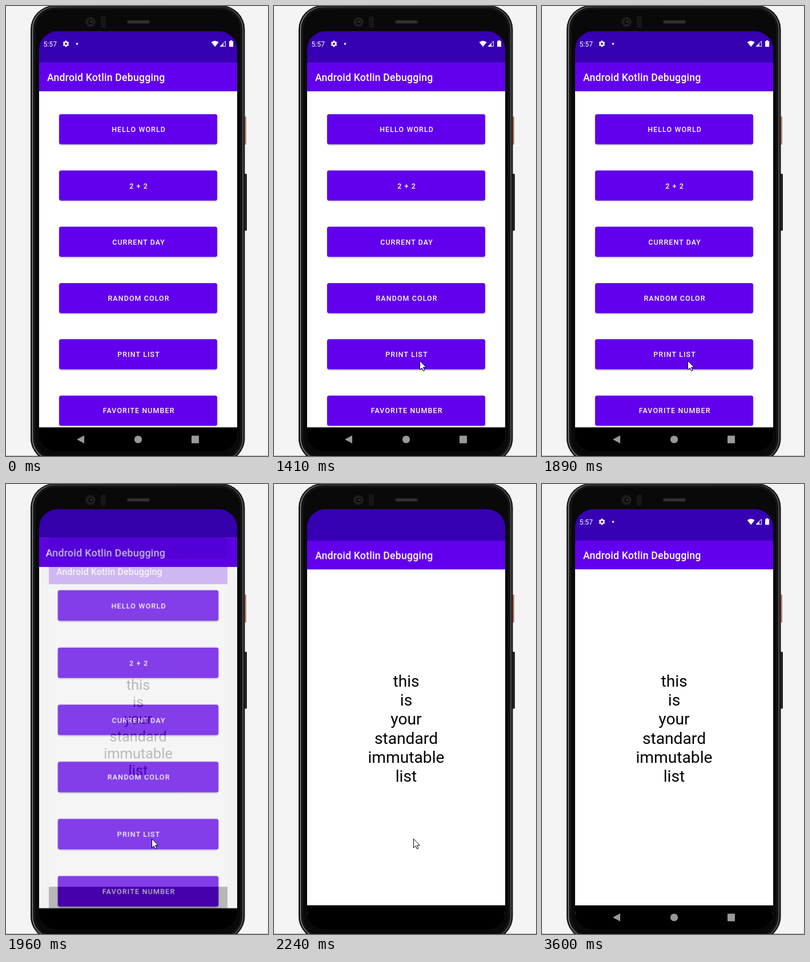
Recreate the animation shown at these times as an HTML page. Size 459 by 786 pixels, loop 4.2 s.

```html
<!DOCTYPE html>
<html lang="en">
<head>
<meta charset="utf-8">
<title>Android Kotlin Debugging</title>
<style>
  html, body { margin: 0; width: 100%; height: 100%; overflow: hidden; background: #f4f4f4; }
  svg { display: block; width: 459px; height: 786px; font-family: Roboto, sans-serif; }
  .title { font: 500 17.67px Roboto, sans-serif; letter-spacing: .22px; fill: #fff; }
  .label { font: 500 12.4px Roboto, sans-serif; letter-spacing: 1.13px; fill: #fff; text-anchor: middle; }
  .list { font-size: 28.2px; fill: #000; text-anchor: middle; }
  .clock { font-size: 12.2px; fill: #fff; }

  .anim { animation: 4.2s step-end infinite; }
  #home, #detail { transform-origin: 231.5px 410px; }
  #home { animation-name: leave; }
  #detail { animation-name: enter; opacity: 0; }
  #scrim { animation-name: dim; opacity: 0; }
  #icons { animation-name: blink; }
  #ripple { animation-name: ripple; opacity: 0; }
  #lift { animation-name: lift; opacity: 0; }
  #cursor { animation-name: point; opacity: 0; }

  @keyframes leave {
    0% { transform: none; }
    46.66% { transform: scale(1.016); }
    48.33% { transform: scale(1.042); }
    49.99%, 100% { transform: scale(1.047); }
  }
  @keyframes dim {
    0% { opacity: 0; }
    46.66% { opacity: .05; }
    48.33%, 100% { opacity: .13; }
  }
  @keyframes enter {
    0% { opacity: 0; transform: scale(.85); }
    46.66% { opacity: .24; transform: scale(.9); }
    48.33% { opacity: 1; transform: scale(.98); }
    49.99% { opacity: 1; transform: scale(.993); }
    51.66% { opacity: 1; transform: scale(.998); }
    53.33% { opacity: 1; transform: scale(.9993); }
    54.99%, 100% { opacity: 1; transform: none; }
  }
  @keyframes blink {
    0% { opacity: 1; }
    46.66% { opacity: 0; }
    54.99% { opacity: .5; }
    56.66%, 100% { opacity: 1; }
  }
  @keyframes ripple {
    0% { opacity: 0; transform: scale(0); }
    35.23% { opacity: .18; transform: scale(.3); }
    36.9% { opacity: .2; transform: scale(1); }
    38.57% { opacity: .1; transform: scale(1); }
    40.23%, 100% { opacity: 0; transform: scale(1); }
  }
  @keyframes lift {
    0% { opacity: 0; }
    35.23% { opacity: .5; }
    36.9% { opacity: 1; }
    38.57% { opacity: .5; }
    40.23%, 100% { opacity: 0; }
  }
  @keyframes point {
    0% { opacity: 0; transform: translate(322px, 652px); }
    9.28% { opacity: 1; transform: translate(322px, 652px); }
    10.95% { opacity: 1; transform: translate(306px, 645px); }
    12.61% { opacity: 1; transform: translate(293px, 639px); }
    14.28% { opacity: 1; transform: translate(283px, 634px); }
    15.95% { opacity: 1; transform: translate(276px, 630px); }
    17.61% { opacity: 1; transform: translate(270px, 628px); }
    19.28% { opacity: 1; transform: translate(267px, 626px); }
    20.95% { opacity: 1; transform: translate(265px, 625px); }
    22.61% { opacity: 1; transform: translate(248px, 610px); }
    24.28% { opacity: 1; transform: translate(240px, 604px); }
    27.38% { opacity: 1; transform: translate(255px, 619px); }
    51.66% { opacity: 1; transform: translate(250px, 619px); }
    53.33% { opacity: 1; transform: translate(244px, 619px); }
    54.99% { opacity: 1; transform: translate(239px, 619px); }
    56.66% { opacity: 1; transform: translate(236px, 619px); }
    58.33% { opacity: 1; transform: translate(234px, 619px); }
    63.09% { opacity: 1; transform: translate(233px, 619px); }
    64.99% { opacity: 1; transform: translate(232px, 620px); }
    75.95% { opacity: 0; transform: translate(232px, 620px); }
    80.71% { opacity: 1; transform: translate(394px, 783px); }
    82.38% { opacity: 1; transform: translate(394px, 782px); }
    84.04% { opacity: 1; transform: translate(396px, 782px); }
    85.71%, 100% { opacity: 0; transform: translate(396px, 786px); }
  }
</style>
</head>
<body>
<svg viewBox="0 0 459 786">
  <defs>
    <linearGradient id="rim">
      <stop offset="0" stop-color="#858585"/>
      <stop offset=".12" stop-color="#3a3a3a"/>
      <stop offset=".9" stop-color="#2c2c2c"/>
      <stop offset="1" stop-color="#5c5c5c"/>
    </linearGradient>
    <clipPath id="screen"><rect x="58" y="44" width="347" height="734" rx="32"/></clipPath>
    <clipPath id="pressed"><rect x="93" y="582.1" width="277" height="52.5" rx="3.5"/></clipPath>
    <filter id="soft" x="-10%" y="-30%" width="120%" height="180%"><feGaussianBlur stdDeviation="1.3"/></filter>
    <g id="btn">
      <rect x="93.5" y="1.8" width="276" height="52" rx="3.5" opacity=".33" filter="url(#soft)"/>
      <rect x="93" width="277" height="52.5" rx="3.5" fill="#6200ee"/>
    </g>
    <g id="window">
      <rect x="58" y="44" width="347" height="734" fill="#fff"/>
      <rect x="58" y="44" width="347" height="55" fill="#3700b3"/>
      <rect x="58" y="98.7" width="347" height="50.3" fill="#6200ee"/>
      <text class="title" x="72" y="131">Android Kotlin Debugging</text>
      <rect x="58" y="736" width="347" height="42"/>
    </g>
  </defs>

  <rect width="459" height="786" fill="#f4f4f4"/>
  <rect y="785" width="459" height="1" fill="#b4b4b4"/>

  <!-- phone body -->
  <rect x="416" y="193" width="5" height="49" rx="1" fill="#c5806f"/>
  <rect x="416" y="293" width="6" height="99.5" rx="1.5" fill="#222"/>
  <rect x="43" y="-1" width="375.5" height="798" rx="42" fill="#181818"/>
  <rect x="46.5" y="1.8" width="368.5" height="792" rx="39" fill="#111" stroke="url(#rim)" stroke-width="1.6"/>
  <rect x="50.5" y="5" width="361" height="786" rx="36" fill="#090909" stroke="#1d1d1d"/>
  <circle cx="148" cy="28" r="9" fill="#1b1b1b"/>
  <circle cx="148" cy="28" r="5" fill="#0c0c0c" stroke="#2d2d2d"/>
  <circle cx="149" cy="27.5" r="1.6" fill="#3c3c3c"/>
  <rect x="166" y="18" width="9" height="20" rx="3" fill="#161616"/>
  <rect x="212" y="24.5" width="40" height="6.5" rx="3" fill="#232323"/>
  <path d="M215 27.7H249" stroke="#454545" stroke-width="2.4" stroke-dasharray="1.5 1"/>

  <g clip-path="url(#screen)">
    <rect x="58" y="44" width="347" height="734"/>

    <g id="home" class="anim">
      <use href="#window"/>
      <rect id="lift" class="anim" x="94" y="586" width="275" height="52.5" rx="3.5" fill="#777" filter="url(#soft)"/>
      <use href="#btn" y="189"/>
      <use href="#btn" y="287.3"/>
      <use href="#btn" y="385.6"/>
      <use href="#btn" y="483.9"/>
      <use href="#btn" y="582.1"/>
      <use href="#btn" y="680.4"/>
      <rect x="58" y="736" width="347" height="42"/>
      <g clip-path="url(#pressed)"><g transform="translate(255 619)">
        <circle id="ripple" class="anim" r="180" fill="#fff"/>
      </g></g>
      <g class="label">
        <text x="232.6" y="220.4">HELLO WORLD</text>
        <text x="232.6" y="318.6">2 + 2</text>
        <text x="232.6" y="416.8">CURRENT DAY</text>
        <text x="232.6" y="515">RANDOM COLOR</text>
        <text x="232.6" y="613.2">PRINT LIST</text>
        <text x="232.6" y="711.4">FAVORITE NUMBER</text>
      </g>
    </g>
    <rect id="scrim" class="anim" x="58" y="44" width="347" height="734"/>

    <g id="detail" class="anim">
      <use href="#window"/>
      <g class="list">
        <text x="231.5" y="354">this</text>
        <text x="231.5" y="387.2">is</text>
        <text x="231.5" y="420.4">your</text>
        <text x="231.5" y="453.6">standard</text>
        <text x="231.5" y="486.8">immutable</text>
        <text x="231.5" y="520">list</text>
      </g>
    </g>

    <!-- system bars -->
    <g id="icons" class="anim" fill="#fff">
      <text class="clock" x="65.5" y="70.7">5:57</text>
      <circle cx="105" cy="66" r="3.1" fill="none" stroke="#fff" stroke-width="2.4"/>
      <path d="M105 60.6V63M105 69V71.4M100.3 63.3L102.4 64.5M107.6 67.5L109.7 68.7M100.3 68.7L102.4 67.5M107.6 64.5L109.7 63.3" stroke="#fff" stroke-width="2.6"/>
      <circle cx="124.5" cy="66" r="1.8"/>
      <path d="M359.6 63.2Q366 58.2 372.6 63.2L366.1 71.2Z"/>
      <path d="M384.3 61.5V70.5H375.3Z" fill="none" stroke="#fff"/>
      <path d="M380.8 65V71H374.6Z"/>
      <path d="M391 61.3H393V60H396V61.3H398V71.2H391Z"/>
      <g fill="#999">
        <path d="M124 757L137 750V764Z"/>
        <circle cx="231.5" cy="757" r="6.6"/>
        <rect x="325" y="750.5" width="13" height="13.3" rx="1"/>
      </g>
    </g>
  </g>

  <path id="cursor" class="anim" d="M.5 .8V16.5L4.1 13.2L6.6 18.5L8.9 17.5L6.5 12.1H11.5Z" fill="#fff" stroke="#000"/>
</svg>
</body>
</html>
```
